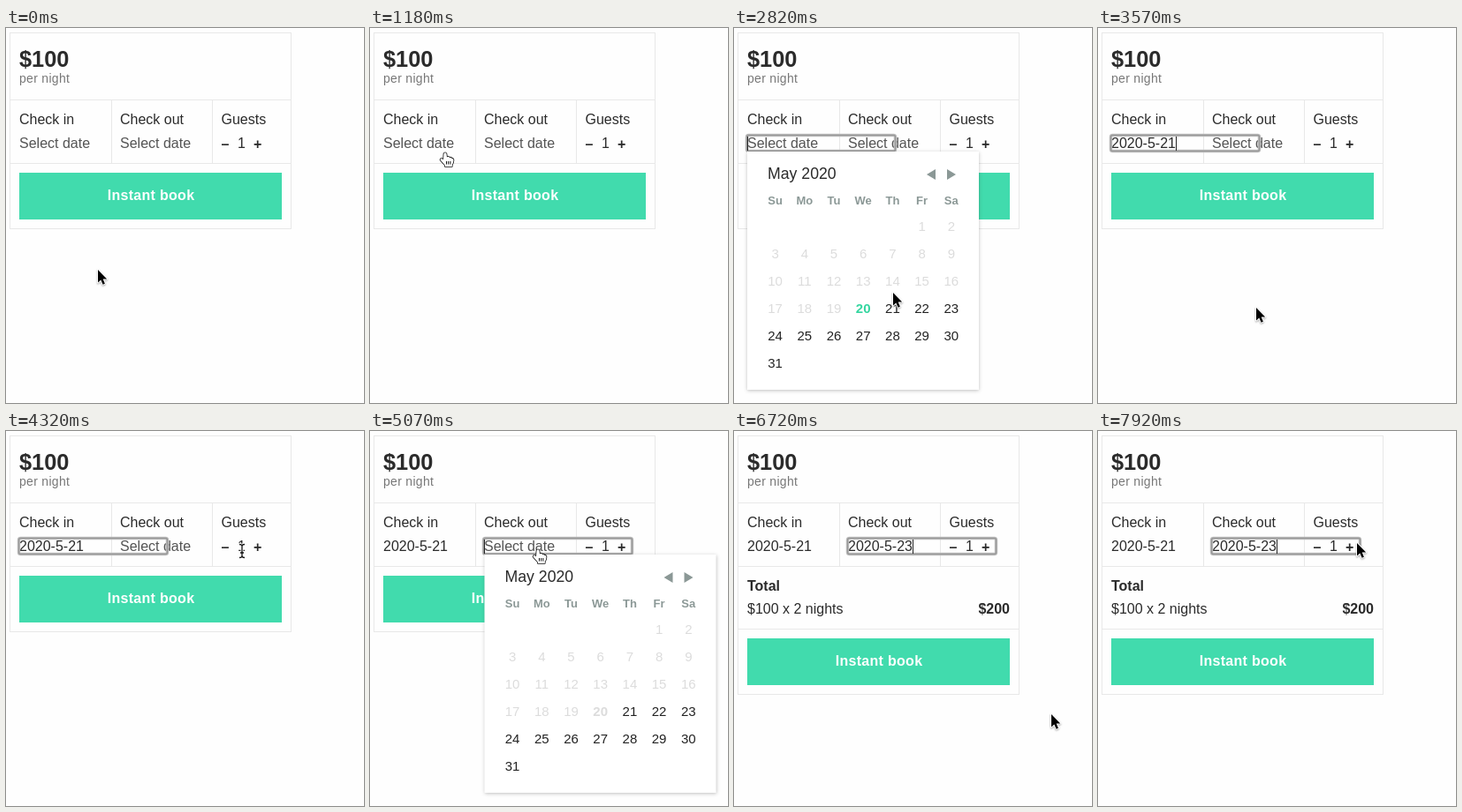
These frames come from a looping animation (405x425 px, 8 s). An HTML page with a canvas:

```html
<!DOCTYPE html>
<html lang="en">
<head>
<meta charset="utf-8">
<title>Booking form</title>
<style>
  html, body { margin: 0; height: 100%; overflow: hidden; background: #fefefe; }
  canvas { display: block; }
</style>
</head>
<body>
<canvas width="405" height="425"></canvas>
<script>
const ctx = document.querySelector('canvas').getContext('2d');
const LOOP = 8000;
const INK = '#2b2b2b', SOFT = '#555', LINE = '#e8e8e8', GREEN = '#41dbad', MUTED = '#8b9896';

// Moments at which the form changes
const IN_OPEN = 1370, IN_PICK = 3420, OUT_OPEN = 4870, OUT_PICK = 6570;

// Pointer: time, x, y, shape held until the next key
const POINTER = [
  [0, 104, 274, 'arrow'], [150, 105, 277, 'arrow'], [450, 110, 292, 'arrow'],
  [750, 111, 214, 'hand'], [1050, 90, 152, 'hand'], [1180, 85, 141, 'hand'],
  [1330, 85, 135, 'hand'], [2220, 85, 135, 'hand'], [2370, 94, 160, 'arrow'],
  [2820, 180, 300, 'arrow'], [3120, 179, 317, 'hand'], [3570, 179, 317, 'arrow'],
  [4020, 179, 317, 'arrow'], [4320, 267, 136, 'beam'], [4470, 226, 132, 'hand'],
  [4620, 190, 134, 'hand'], [5220, 190, 134, 'hand'], [5370, 199, 160, 'arrow'],
  [5820, 267, 303, 'arrow'], [6120, 362, 326, 'hand'], [6270, 359, 321, 'hand'],
  [6570, 359, 321, 'arrow'], [6720, 359, 321, 'arrow'], [7020, 360, 312, 'arrow'],
  [7470, 342, 244, 'arrow'], [7920, 293, 127, 'arrow'], [LOOP, 293, 127, 'arrow']
];

const SHAPES = {
  arrow: new Path2D('M0 0V14.5L3.3 11.5L5.6 16.7L7.9 15.7L5.7 10.5H10.2Z'),
  hand: new Path2D('M-1.5 1.5Q0-.8 1.5 1.5L2 5.5Q3.8 4 5 6Q6.8 5 7.6 7Q9.6 6.4 9.5 9Q9.4 12 7.8 14V16H0L-.5 14Q-3 11.5-5.5 8.5Q-5 5.8-2 8.2Z'),
  beam: new Path2D('M-3-7.5Q0-7.5 0-5.5Q0-7.5 3-7.5M0-5.5V5.5M-3 7.5Q0 7.5 0 5.5Q0 7.5 3 7.5M-2 2H2')
};

function text(str, x, y, { size = 16, color = INK, bold = false, align = 'left', spacing = 0 } = {}) {
  ctx.font = `${bold ? 'bold ' : ''}${size}px "Liberation Sans", Arial, sans-serif`;
  ctx.letterSpacing = spacing + 'px';
  ctx.textAlign = align;
  ctx.fillStyle = color;
  ctx.fillText(str, x, y);
}

function rect(x, y, w, h, color) {
  ctx.fillStyle = color;
  ctx.fillRect(x, y, w, h);
}

function path(shape, fill, stroke, width) {
  ctx.lineWidth = width;
  ctx.strokeStyle = stroke;
  ctx.stroke(shape);
  if (fill) {
    ctx.fillStyle = fill;
    ctx.fill(shape);
  }
}

// The screen refreshes in 150 ms steps, with two shorter ones
function snap(t) {
  const start = t >= 1920 ? 1920 : t >= 1180 ? 1180 : 0;
  return start + Math.floor((t - start) / 150) * 150;
}

function pointerAt(t) {
  const i = POINTER.findIndex(key => key[0] > t);
  const [t0, x0, y0, shape] = POINTER[i - 1], [t1, x1, y1] = POINTER[i];
  const k = (t - t0) / (t1 - t0);
  return { x: Math.round(x0 + (x1 - x0) * k), y: Math.round(y0 + (y1 - y0) * k), shape };
}

function drawForm(checkIn, checkOut, pointer, covered) {
  const shift = checkOut ? 71 : 0;
  ctx.lineWidth = 1;
  ctx.strokeStyle = LINE;
  ctx.strokeRect(4.5, 5.5, 318, 222 + shift);
  for (const y of [81, 153, 153 + shift]) rect(4, y, 319, 1, LINE);
  for (const x of [119, 233]) rect(x, 81, 1, 73, LINE);

  text('$100', 15, 44, { size: 25.4, bold: true });
  text('per night', 15, 62, { size: 14, color: '#777', spacing: 0.3 });
  text('Check in', 15, 109);
  text('Check out', 129, 109);
  text('Guests', 243.5, 109);
  text(checkIn || 'Select date', 15, 136, { color: checkIn ? INK : SOFT });
  text(checkOut || 'Select date', 129, 136, { color: checkOut ? INK : SOFT });
  text('–', 243.5, 137, { bold: true });
  text('1', 262, 136);
  text('+', 280, 137, { bold: true });

  if (checkOut) {
    text('Total', 15, 181, { bold: true });
    text('$100 x 2 nights', 15, 207);
    text('$200', 312, 207, { bold: true, align: 'right' });
  }

  const top = 164 + shift;
  const hover = !covered && pointer.x >= 15 && pointer.x < 312 && pointer.y >= top && pointer.y < top + 53;
  rect(15, top, 297, 53, hover ? '#3dd4a7' : GREEN);
  text('Instant book', 164, top + 31, { color: '#fff', bold: true, align: 'center', spacing: 0.3 });
}

function drawFocus(x, value, caretOn) {
  ctx.strokeStyle = '#c0c0c0';
  ctx.lineWidth = 3.5;
  ctx.beginPath();
  ctx.roundRect(x - 0.5, 121.5, 168, 18, 2);
  ctx.stroke();
  ctx.strokeStyle = '#989898';
  ctx.lineWidth = 1.5;
  ctx.stroke();
  if (caretOn) rect(x + (value ? 73 : 0), 123, 1, 16, '#222');
}

function drawCalendar(x, firstDay) {
  ctx.save();
  ctx.shadowColor = 'rgba(0,0,0,.25)';
  ctx.shadowBlur = 4;
  ctx.shadowOffsetY = 1;
  rect(x, 140, 262, 270, '#fff');
  ctx.restore();

  text('May 2020', x + 23, 171, { size: 17.7 });
  for (const [base, tip] of [[213, 203], [226, 236]]) {
    ctx.fillStyle = MUTED;
    ctx.beginPath();
    ctx.moveTo(x + base, 160);
    ctx.lineTo(x + tip, 166);
    ctx.lineTo(x + base, 172);
    ctx.fill();
  }

  const column = i => x + 31.6 + i * 33.2;
  ['Su', 'Mo', 'Tu', 'We', 'Th', 'Fr', 'Sa'].forEach((name, i) =>
    text(name, column(i), 200, { size: 13, color: MUTED, bold: true, align: 'center' }));
  for (let day = 1; day <= 31; day++) {
    const cell = day + 4, today = day === 20;
    const color = day < firstDay ? '#dcdcdc' : today ? '#35d6a0' : '#222';
    text(day, column(cell % 7), 230 + Math.floor(cell / 7) * 31,
      { size: 15, color, bold: today, align: 'center' });
  }
}

function drawPointer({ x, y, shape }) {
  ctx.save();
  ctx.translate(x, y);
  ctx.lineJoin = 'round';
  const outline = SHAPES[shape];
  if (shape === 'beam') {
    path(outline, null, '#fff', 3);
    path(outline, null, '#111', 1.3);
  } else if (shape === 'hand') {
    path(outline, '#fff', '#111', 1.6);
    ctx.lineWidth = 1;
    ctx.stroke(new Path2D('M1.5 10V13.5M3.7 10V13.5M5.9 10V13.5'));
  } else {
    ctx.shadowColor = 'rgba(0,0,0,.35)';
    ctx.shadowBlur = 2;
    ctx.shadowOffsetY = 1;
    path(outline, null, '#fff', 2);
    ctx.shadowColor = 'transparent';
    path(outline, '#000', '#fff', 1);
  }
  ctx.restore();
}

function draw(now) {
  const t = snap(now % LOOP);
  const pointer = pointerAt(t);
  const checkIn = t >= IN_PICK && '2020-5-21';
  const checkOut = t >= OUT_PICK && '2020-5-23';
  const inOpen = t >= IN_OPEN && t < IN_PICK;
  const outOpen = t >= OUT_OPEN && t < OUT_PICK;

  rect(0, 0, 405, 425, '#fefefe');
  drawForm(checkIn, checkOut, pointer, inOpen || outOpen);

  const focused = [OUT_PICK, OUT_OPEN, IN_PICK, IN_OPEN].find(start => t >= start);
  if (focused) {
    const caretOn = (t - focused) % 1000 < (focused === IN_PICK ? 450 : 500);
    if (t < OUT_OPEN) drawFocus(15, checkIn, caretOn);
    else drawFocus(129, checkOut, caretOn);
  }
  if (inOpen) drawCalendar(15, 20);
  if (outOpen) drawCalendar(129.5, 21);
  drawPointer(pointer);
}

const start = performance.now();
(function tick() {
  draw(performance.now() - start);
  requestAnimationFrame(tick);
})();
</script>
</body>
</html>
```
